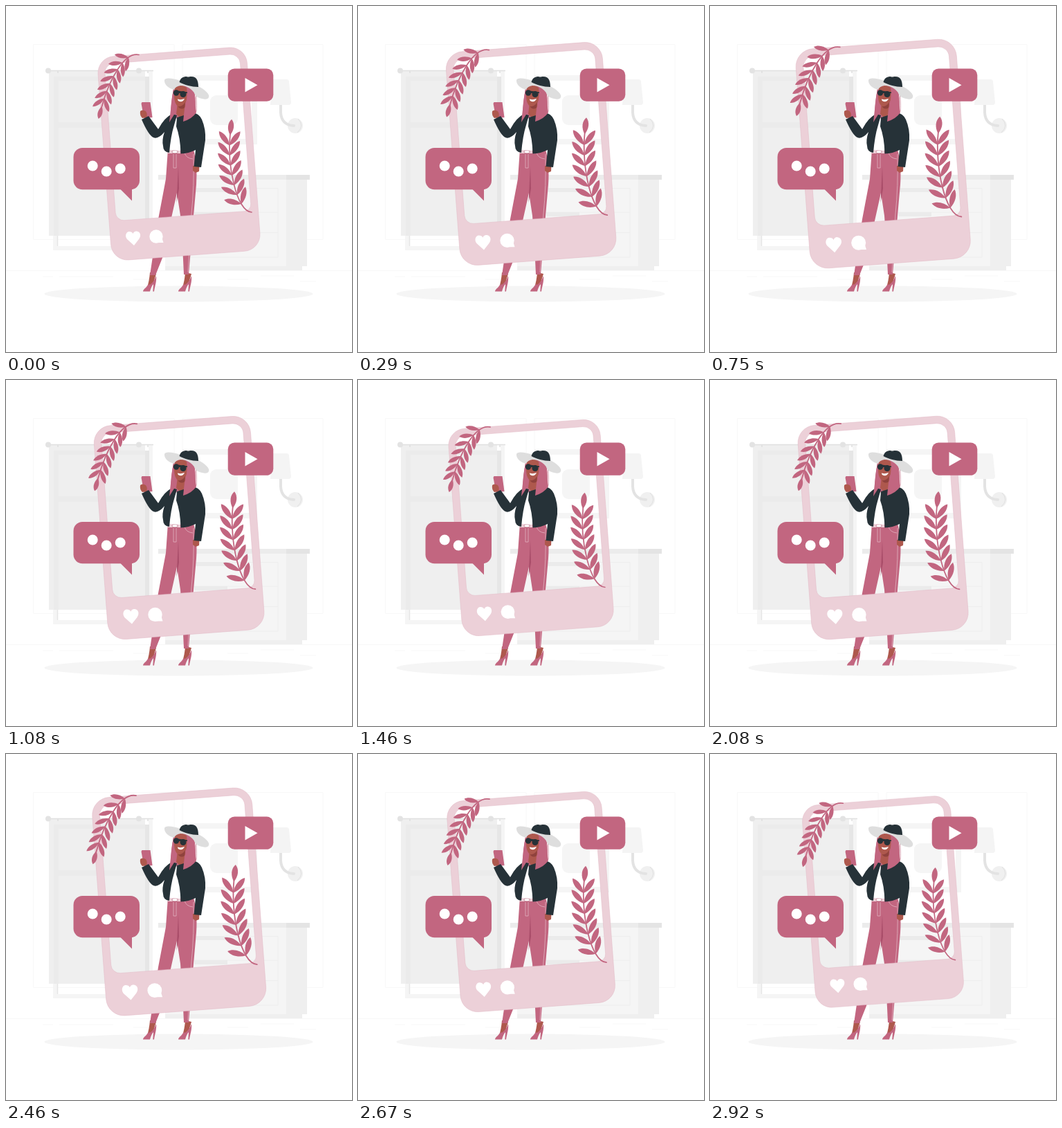
Animation, 500 px wide and 500 px high, one loop 2.96 s. Source, as an HTML page:

```html
<!DOCTYPE html>
<html lang="en">
<head>
<meta charset="utf-8">
<title>Phone frame pulse</title>
<style>
html, body { margin: 0; width: 100%; height: 100%; overflow: hidden; background: #fff; }
svg { display: block; width: 100vw; height: 100vh; }
.pink { fill: #c26680; }
.dark { fill: #263238; }
.skin { fill: #ae584d; }
.white { fill: #fff; }
.thin { fill: none; stroke: #e6bcc8; stroke-width: .7; }
.stem { fill: none; stroke: #c26680; stroke-width: 1.7; stroke-linecap: round; }
</style>
</head>
<body>
<svg viewBox="0 0 500 500">
  <!-- room -->
  <g fill="none" stroke="#f6f6f6" stroke-width=".8">
    <path d="M39.5 55.500H243V337.500H39.500ZM255 55.500H458V337.500H255ZM0 382.500H500"/>
    <path d="M53 391H68M77 391H155M184 395H215M320 395H350M368 390H416M425 398H448"/>
  </g>
  <ellipse cx="249.5" cy="416" rx="194" ry="11.5" fill="#f5f5f5"/>

  <!-- window -->
  <path d="M71 94V350H209V94" fill="none" stroke="#f5f5f5" stroke-width="6"/>
  <path d="M74.5 94V347" stroke="#e6e6e6" stroke-width="1.5"/>
  <path d="M62 94H201V332H62Z" fill="#efefef"/>
  <path d="M69 102H207V108H76V168H207V176H76V332H69Z" fill="#ebebeb"/>
  <path d="M201 102H207V332H201Z" fill="#e6e6e6"/>
  <path d="M61 93.5H213M75 93V97M205 93V97" stroke="#e0e0e0" stroke-width="1.6"/>
  <g fill="#e3e3e3"><circle cx="61" cy="93.5" r="4"/><circle cx="192" cy="93.5" r="4"/></g>

  <!-- shelf and lamp -->
  <path d="M255 100H363V200H255V192H355V108H255Z" fill="#f5f5f5"/>
  <rect x="295" y="129" width="40" height="43" rx="9" fill="#f5f5f5"/>
  <circle cx="418" cy="173" r="11" fill="#f0f0f0"/>
  <path d="M422 163Q432 173 421 183" fill="none" stroke="#e0e0e0"/>
  <path d="M397 142V154Q398 172 416 173" fill="none" stroke="#e3e3e3" stroke-width="4" stroke-linecap="round"/>
  <path d="M384 109Q384 106 388 106H405Q409 106 409 109L412 139Q412 143 408 143H382Z" fill="#f4f4f4"/>

  <!-- dresser -->
  <path d="M230 250H405V376H230Z" fill="#f5f5f5"/>
  <path d="M405 250H435V376H405ZM230 376H428V382H230Z" fill="#efefef"/>
  <path d="M220 244H405V251H220Z" fill="#ececec"/>
  <path d="M405 244H439V251H405Z" fill="#e4e4e4"/>
  <path d="M255 263.5H393V363H255ZM255 298H393M255 327.5H393" fill="none" stroke="#eee"/>
  <path d="M272 263H320V269H272ZM272 298H320V304H272Z" fill="#ebebeb"/>

  <!-- legs -->
  <g id="foot">
    <path class="skin" d="M208 385L217 387 213 400 204 406Q207 398 208 385Z"/>
    <path class="pink" d="M217 390C218 398 215 405 214 412.500H212.300L213 402Q210 405 208 412.500H198Q198 410 202 407L206 402Q208 404 210 401 214 398 217 390Z"/>
  </g>
  <use href="#foot" x="51"/>
  <path class="pink" d="M234 207H271Q277 230 275 258L271 303 264 388H257L255 345 252 303 247 270 239 306 226 364 216 389H208L220 308 231 250Z"/>
  <path d="M249 232L250 264 246.500 284Z" fill="#a94d69"/>
  <path class="thin" d="M242 214V234H246V214M258 212Q260 220 270 221M271 214Q272 262 268 300L263 385"/>
  <path d="M234.500 208H252V213H234Z" fill="#edd0d8"/>
  <rect x="240" y="208.8" width="8" height="4" rx="2" fill="#fff" stroke="#a94d69" stroke-width=".6"/>

  <!-- head and body -->
  <path class="pink" d="M244 114C238 134 238 150 238 167L250 160 257 167Q270 162 274 154C273 138 276 123 264 113Z"/>
  <path class="white" d="M240 164H248L252.500 209 235 208Z"/>
  <path class="skin" d="M248 140H259L260 156 253 163 246 156Z"/>
  <path class="skin" d="M244 118C241 135 245 145 251 146 258 147 263 136 263 119L254 114Z"/>
  <path d="M248 145Q255 146 259 139L258 147Q253 151 248 145Z" fill="#8f423d"/>
  <path class="skin" d="M270 231H279.500L279 239 274 241 270 238Z"/>
  <path class="pink" d="M196.500 139H208.500L211.500 161 199.500 162 195.500 141Z"/>
  <path class="skin" d="M194 152Q197 149 202 152 205 156 203 161L197 162Q193 158 194 152Z"/>
  <path class="dark" d="M196 164L206 159 220 178Q229 161 240 156L247 158 243 172Q238 188 236 212 227 211 227 202 225 194 229 182 220 193 213 190 206 187 196 164Z"/>
  <path class="dark" d="M247 161L257 158 269 154Q279 155 283 164 289 178 288 194L282 233 271.500 232 274 208Q264 213 252.500 213.500 252 190 246 174Z"/>
  <path class="pink" d="M261 116Q263 137 258 148L256 167Q269 163 275 154C272 140 276 126 268 116Z"/>
  <path class="pink" d="M244 118Q241 144 246 152L236 168Q239 140 242 118Z"/>
  <path d="M273 122Q276 134 275 152" class="stem" style="stroke-width:.7"/>
  <g class="dark"><circle cx="246" cy="125.5" r="4.2"/><circle cx="256" cy="127.5" r="4.5"/><path d="M245 122L262 124.500V126H246Z"/></g>
  <path class="white" d="M248 134.500Q253 136 258 134 256 139 251 138 248 137 248 134.500Z"/>
  <path d="M229 108C229 103 240 104 252 108L278 116C288 121 295 128 293 132 291 137 281 134 275 131 271 121 262 115 252 115Q245 116 243 121C235 119 229 114 229 108Z" fill="#dedede"/>
  <path class="dark" d="M250.500 110C252 104 256 102 261 102Q263 103 266 102C275 101 278 107 278 117 268 117 258 114 250.500 110Z"/>

  <!-- pulsing phone frame -->
  <g id="phone">
    <g transform="translate(250 213.5) rotate(-4.3)">
      <path fill="#ecd0d8" stroke="#e2bac6" stroke-width=".5" fill-rule="evenodd" d="M-84 -147.500H84A24 24 0 0 1 108 -123.500V123.500A24 24 0 0 1 84 147.500H-84A24 24 0 0 1 -108 123.500V-123.500A24 24 0 0 1 -84 -147.500ZM-84 -137.500A14 14 0 0 0 -98 -123.500V78A12 12 0 0 0 -86 90H88A10 10 0 0 0 98 80V-123.500A14 14 0 0 0 84 -137.500Z"/>
    </g>
    <path class="white" d="M185 346L175 337C171 332 174 326 178 326Q182 326 183.500 329 185 325 189 325.500C194 326 196 332 192 337Z"/>
    <circle class="white" cx="217" cy="333" r="9.7"/>
    <path class="white" d="M225 334L227.500 342 217 342Z"/>
    <g id="plants" class="pink"></g>
  </g>

  <!-- badges -->
  <rect class="pink" x="97.5" y="205" width="95.5" height="60.2" rx="13"/>
  <path class="pink" d="M165 264.500L182 281.500V260Z"/>
  <g class="white"><circle cx="125.2" cy="231" r="7.5"/><circle cx="145.2" cy="239" r="7.5"/><circle cx="165.2" cy="235" r="7.5"/></g>
  <rect class="pink" x="320.7" y="90.5" width="65.6" height="47.3" rx="9.5"/>
  <path class="white" d="M345.500 104V124.500L363.500 114.300Z"/>
</svg>
<script>
const phone = document.getElementById('phone');

// Pointed leaf growing from (x, y) in the given direction.
function leaf({ x, y }, angle, length, fat) {
  const turn = angle * 180 / Math.PI, mid = length * 0.35, far = length * 0.75, w = length * fat;
  return `<path transform="translate(${x} ${y}) rotate(${turn})" d="M0 0C${mid} ${w} ${far} ${w} ${length} 0C${far} ${-w} ${mid} ${-w} 0 0"/>`;
}

// Curved stem with pairs of leaves that close up towards the tip.
function plant(d, length, pairs = 7) {
  const stem = document.createElementNS('http://www.w3.org/2000/svg', 'path');
  stem.setAttribute('d', d);
  const total = stem.getTotalLength();
  const at = u => stem.getPointAtLength(total * u);
  const heading = u => {
    const a = at(u - 0.01), b = at(u);
    return Math.atan2(b.y - a.y, b.x - a.x);
  };
  let out = `<path class="stem" d="${d}"/>` + leaf(at(0.98), heading(1), length * 0.9, 0.24);
  for (let i = 0; i < pairs; i++) {
    const u = 0.16 + 0.7 * i / (pairs - 1);
    const spread = 0.82 - 0.2 * u;
    for (const side of [-1, 1]) out += leaf(at(u), heading(u) + side * spread, length, 0.2);
  }
  return out;
}

document.getElementById('plants').innerHTML =
  plant('M192 70.500C171 66 149 106 138 147', 20.5) +
  plant('M355 298C333 297 319 230 324 184', 25.5);

// Two beats per loop: a slow fall after the first, a quick one after the second.
const LOOP = 2960, LEAD = 0.0117;
const beat = p => 1 + 0.1 * (p < 0.6
  ? Math.min(p / 0.2, (0.6 - p) / 0.4)
  : Math.min((p - 0.6) / 0.2, (1 - p) / 0.2));

const start = performance.now();
function draw() {
  const p = ((performance.now() - start) / LOOP + LEAD) % 1;
  const scale = beat(p) / beat(LEAD);
  phone.setAttribute('transform', `translate(247.3 213.5) scale(${scale}) translate(-247.3 -213.5)`);
  requestAnimationFrame(draw);
}
draw();
</script>
</body>
</html>
```
